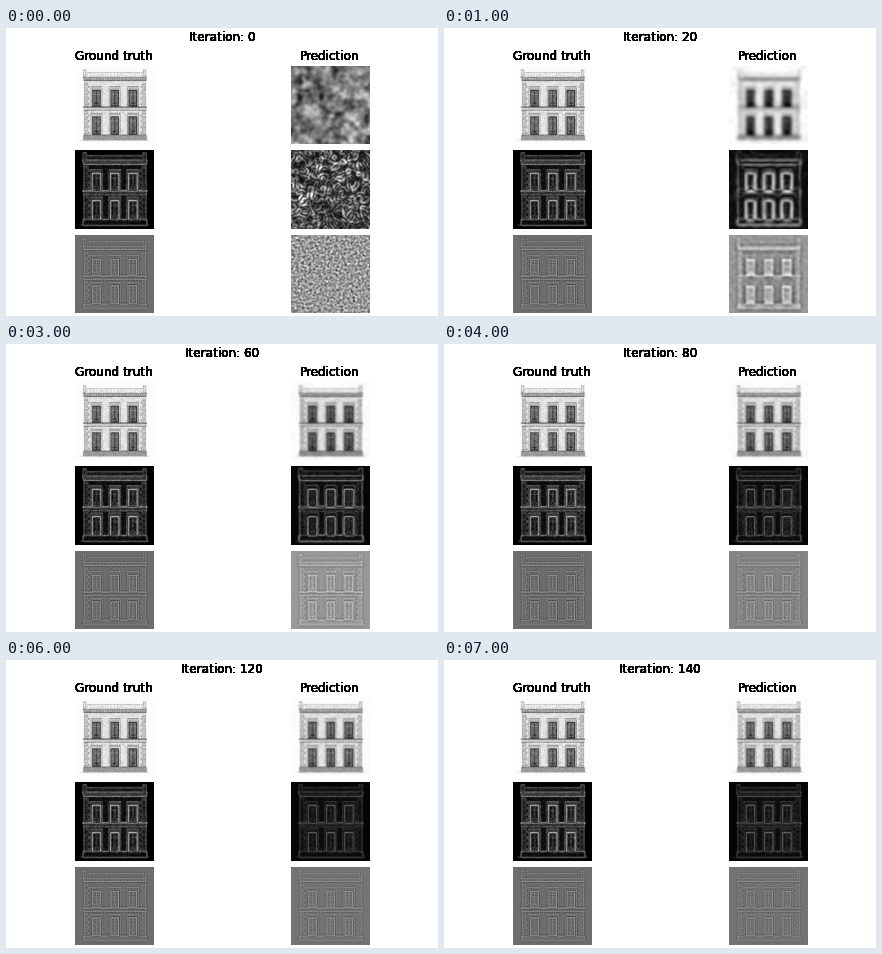
A matplotlib script that plays this animation: 432x288 px, repeating every 8 s.

```python
import numpy as np
import matplotlib.pyplot as plt
from matplotlib.animation import FuncAnimation

W, H = 432, 288
K, N = 4, 79            # samples per pixel, panel size in pixels
SIZE = K * N
LEFT, RIGHT = (69, 148), (285, 364)
ROWS = [(38, 116), (122, 201), (207, 285)]
rng = np.random.default_rng(7)


def blur(a, px):
    """Gaussian blur with a radius in stage pixels."""
    pad = 60
    big = np.pad(a, pad, mode="edge")
    f = np.fft.fftfreq(big.shape[0])
    g = np.exp(-2 * (np.pi * px * K * f) ** 2)
    out = np.fft.ifft2(np.fft.fft2(big) * g[:, None] * g[None, :]).real
    return out[pad:-pad, pad:-pad]


def slope(a):
    gy, gx = np.gradient(a)
    return np.hypot(gx, gy)


def laplacian(a):
    gy, gx = np.gradient(a)
    return np.gradient(gy, axis=0) + np.gradient(gx, axis=1)


def scaled(a, q):
    return a / np.percentile(np.abs(a), q)


def smooth_noise(px):
    edge = 60
    n = blur(rng.standard_normal((SIZE + 2 * edge,) * 2), px)
    n = n[edge:-edge, edge:-edge]
    return (n - n.mean()) / n.std()


def facade():
    a = np.full((SIZE, SIZE), 0.985)

    def rect(x0, y0, x1, y1, v):
        x0, y0, x1, y1 = (int(round(t * K)) for t in (x0, y0, x1, y1))
        a[y0:y1, x0:x1] = v

    # wall with faint courses
    rect(9, 10, 71, 76, 0.89)
    for y in np.arange(17, 70, 2):
        rect(9, y, 71, y + 0.3, 0.84)

    # parapet and main cornice
    rect(9, 6.5, 71, 11, 0.93)
    rect(9, 6.5, 71, 7, 0.6)
    for x in np.arange(12, 68, 3):
        rect(x, 8.2, x + 0.8, 10, 0.8)
    for x in (8, 68):
        rect(x, 3.5, x + 3.2, 11, 0.68)
        rect(x + 0.7, 4.5, x + 2.5, 10, 0.88)
    rect(7.5, 11, 72, 11.8, 0.42)
    rect(8, 11.8, 72, 14, 0.76)
    for x in np.arange(9, 71, 1.75):
        rect(x, 12.2, x + 0.8, 13.8, 0.45)
    rect(8.5, 14, 71.5, 15.2, 0.42)

    # corner blocks
    for i, y in enumerate(np.arange(17, 69, 2.9)):
        w = 5.2 if i % 2 else 3.8
        for x0, x1 in ((9, 9 + w), (71 - w, 71)):
            rect(x0, y, x1, y + 2.4, 0.57)
            rect(x0 + 0.6, y + 0.4, x1 - 0.6, y + 1.8, 0.82)

    def window(c, top, foot):
        rect(c - 6, top, c + 6, foot, 0.86)
        rect(c - 6, top, c + 6, top + 0.8, 0.48)
        rect(c - 5, top + 1.6, c + 5, top + 2.2, 0.55)
        for x in (c - 5.8, c + 5.2):
            rect(x, top + 2, x + 0.6, foot, 0.5)
        rect(c - 4.3, top + 3.5, c + 4.3, foot, 0.16)
        for x in (c - 3.4, c + 0.5):
            rect(x, top + 4.5, x + 2.9, foot - 1, 0.45)
        rect(c - 0.4, top + 4, c + 0.4, foot, 0.25)
        rect(c - 3.6, top + 8, c + 3.6, top + 8.6, 0.65)
        rect(c - 2, foot - 4, c + 2, foot - 2.6, 0.22)

    for c in (21.5, 39.7, 57.9):
        window(c, 20.5, 41)
        window(c, 47.5, 69.5)

    # floor band, plinth and ground
    rect(8, 41, 72, 42.2, 0.38)
    rect(8.5, 42.2, 71.5, 44.5, 0.8)
    rect(8.5, 44.5, 71.5, 45.3, 0.5)
    rect(8.5, 69.5, 71.5, 70.5, 0.45)
    rect(8, 70.5, 72, 75, 0.6)
    rect(5, 75, 74, 75.5, 0.72)

    inside = a < 0.97
    return np.clip(a + inside * 0.04 * smooth_noise(0.3), 0, 1)


TRUTH = facade()


def truth_images():
    edges = scaled(slope(blur(TRUTH, 0.36)), 98)
    lap = scaled(laplacian(blur(TRUTH, 0.42)), 99)
    return TRUTH, 0.75 * edges, 0.43 + 0.26 * lap


def start_images():
    image = 0.48 + 0.11 * smooth_noise(2.6) + 0.07 * smooth_noise(1.5)
    edges = scaled(slope(smooth_noise(1.5)), 98.5)
    lap = scaled(laplacian(smooth_noise(1.0)), 99.5)
    return image, 0.8 * edges, 0.6 + 0.34 * lap


# iteration: blur, depth, tone power, edge level, laplacian mid, laplacian level
STAGES = {
    20: (1.65, 0.95, 1.40, 0.72, 0.60, 0.27),
    40: (1.05, 0.88, 1.15, 0.60, 0.60, 0.22),
    60: (0.75, 0.86, 1.0, 0.55, 0.60, 0.19),
    80: (0.60, 0.85, 1.0, 0.45, 0.52, 0.18),
    100: (0.52, 0.85, 1.0, 0.40, 0.46, 0.18),
    120: (0.47, 0.85, 1.0, 0.43, 0.455, 0.19),
    140: (0.43, 0.85, 1.0, 0.46, 0.45, 0.20),
}
RIPPLE = smooth_noise(2.0)


def fit_images(step):
    px, depth, power, edge, mid, level = STAGES[step]
    dark = np.clip(0.985 - blur(TRUTH, px), 0, 1)
    shown = 0.985 - depth * (dark / dark.max()) ** power
    shown = shown + 0.35 / step * RIPPLE
    edges = scaled(slope(shown), 99.5)
    lap = scaled(laplacian(shown), 99.5)
    return shown, 0.02 + edge * edges, mid + level * lap


STEPS = [0] + list(STAGES)
PREDICTIONS = [start_images()] + [fit_images(s) for s in STAGES]

fig = plt.figure(figsize=(W / 72, H / 72), dpi=72, facecolor="white")


def panel(cols, rows, data):
    (x0, x1), (y0, y1) = cols, rows
    ax = fig.add_axes([x0 / W, 1 - y1 / H, (x1 - x0) / W, (y1 - y0) / H])
    ax.axis("off")
    return ax.imshow(np.clip(data, 0, 1), cmap="gray", vmin=0, vmax=1,
                     aspect="auto")


def label(x, y, text):
    # stacked copies give the heavy overdrawn edge
    return [fig.text(x / W, 1 - y / H, text, ha="center", va="baseline",
                     fontsize=12, family="DejaVu Sans") for _ in range(20)]


for rows, data in zip(ROWS, truth_images()):
    panel(LEFT, rows, data)
views = [panel(RIGHT, rows, data) for rows, data in zip(ROWS, PREDICTIONS[0])]
label(108.25, 32, "Ground truth")
label(324, 32, "Prediction")
heading = label(216, 13, "Iteration: 0")


def draw(i):
    for view, data in zip(views, PREDICTIONS[i]):
        view.set_data(np.clip(data, 0, 1))
    for t in heading:
        t.set_text(f"Iteration: {STEPS[i]}")
    return views + heading


anim = FuncAnimation(fig, draw, frames=len(STEPS), interval=1000, repeat=True,
                     repeat_delay=0, blit=False)
plt.show()
```
